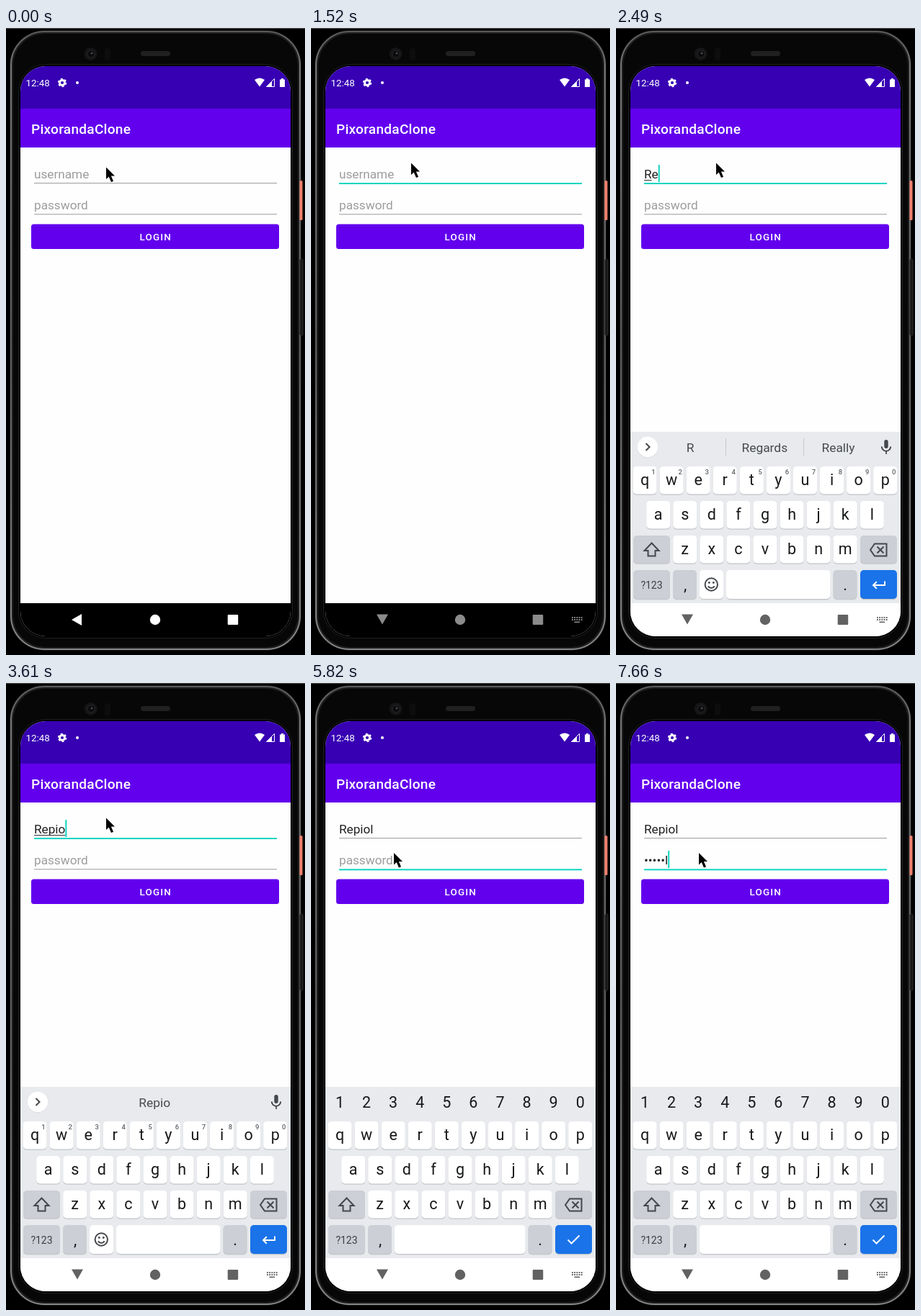
Write an HTML page that moves like this. It is 415 by 871 pixels and loops after 8000 ms.

```html
<!DOCTYPE html>
<html lang="en">
<head>
<meta charset="utf-8">
<title>Login screen</title>
<style>
  html, body { margin: 0; width: 100%; height: 100%; overflow: hidden; background: #000; }
  svg { display: block; width: 100%; height: 100%; font-family: Roboto, sans-serif; }
  .mid { text-anchor: middle; }
  .field { font-size: 17.2px; fill: #212121; }
  .letter { font-size: 21.5px; fill: #17181a; }
  .small { font-size: 9.5px; font-weight: 500; fill: #5f6368; }
  .word { font-size: 17.4px; fill: #46494d; }
  .icon { fill: none; stroke: #44474b; stroke-width: 2; }
  .go { fill: none; stroke: #fff; stroke-width: 2; }
</style>
</head>
<body>
<svg viewBox="0 0 415 871">
  <defs>
    <clipPath id="glass"><rect x="20" y="53" width="375" height="792" rx="35"/></clipPath>
    <linearGradient id="rim" x2="0" y2="1">
      <stop offset="0" stop-color="#5a5a5a"/><stop offset=".06" stop-color="#777"/>
      <stop offset=".5" stop-color="#5c5c5c"/><stop offset="1" stop-color="#858585"/>
    </linearGradient>
  </defs>

  <!-- phone body -->
  <rect width="415" height="871"/>
  <rect width="415" height="1" fill="#4a4a4a"/>
  <rect x="5.500" y="3.500" width="404" height="861" rx="48" fill="#2c2c2c"/>
  <rect x="7" y="5" width="401" height="858" rx="46.500" fill="#1d1d1d" stroke="url(#rim)" stroke-width="2"/>
  <rect x="10" y="8" width="395" height="852" rx="44" fill="#070707"/>
  <rect x="17.500" y="50.500" width="380" height="797" rx="37.500" fill="#000" stroke="#1f1f1f"/>
  <rect x="407.500" y="212" width="4" height="55" rx="1.500" fill="#f0806c"/>
  <rect x="408" y="321" width="4" height="106" rx="1.500" fill="#181818" stroke="#2e2e2e"/>
  <circle cx="117.500" cy="36" r="9" fill="#151516"/>
  <circle cx="118" cy="36" r="5" fill="#0b0b0d" stroke="#28282b"/>
  <circle cx="119" cy="35" r="1.500" fill="#45454e"/>
  <rect x="137" y="28" width="8" height="17" rx="3" fill="#0d0d0d"/>
  <rect x="187" y="32" width="41" height="7" rx="3.500" fill="#202020"/>

  <g clip-path="url(#glass)">
    <rect x="20" y="53" width="375" height="792" fill="#fefefe"/>
    <rect x="20" y="53" width="375" height="59" fill="#3700b3"/>
    <rect x="20" y="112" width="375" height="54" fill="#6200ee"/>

    <!-- status bar -->
    <g fill="#fff">
      <text x="27.500" y="81" font-size="13.400">12:48</text>
      <circle cx="78" cy="76" r="3.500" fill="none" stroke="#fff" stroke-width="2.800"/>
      <circle cx="78" cy="76" r="5.300" fill="none" stroke="#fff" stroke-width="1.800" stroke-dasharray="2.800 2.750"/>
      <circle cx="99" cy="76" r="2"/>
      <path d="M345 72Q352 67 359 72L352 81.500Z"/>
      <path d="M361.500 81.500L372.500 70.500V81.500Z" fill="none" stroke="#fff"/>
      <path d="M361 82L369 74V82Z"/>
      <path d="M380 71.500h2V70h3v1.500h2V82h-7Z"/>
    </g>
    <text x="35" y="146.500" font-size="19.100" font-weight="500" letter-spacing=".24" fill="#fff">PixorandaClone</text>

    <!-- form -->
    <rect id="userLine" x="39"/>
    <rect id="passLine" x="39"/>
    <text id="userHint" class="field" x="39" y="209">username</text>
    <text id="passHint" class="field" x="39" y="252">password</text>
    <text id="user" class="field" x="39" y="209"></text>
    <text id="pass" class="field" x="39" y="252"></text>
    <rect id="mark" x="39" y="211" height="1" fill="#333"/>
    <rect id="caret" width="2" height="24" fill="#12d5c1"/>
    <rect x="35" y="272.500" width="344" height="34.500" rx="3.500" fill="#6200ee"/>
    <text class="mid" x="207.700" y="295" font-size="13.400" font-weight="500" letter-spacing="1.200" fill="#fff">LOGIN</text>

    <!-- keyboard -->
    <g id="board">
      <rect x="20" y="561" width="375" height="240" fill="#e8eaed"/>
      <g id="keys"></g>
      <g id="plain">
        <circle cx="44" cy="582.500" r="14.500" fill="#d5d7da"/>
        <circle cx="44" cy="582" r="14.300" fill="#fff"/>
        <path class="icon" d="M41.500 577l5 5l-5 5"/>
        <g fill="#44474b"><rect x="372.300" y="572" width="5.400" height="12" rx="2.700"/><rect x="374.200" y="587" width="1.700" height="5"/></g>
        <path class="icon" d="M368.800 581.500a6.200 6.200 0 0 0 12.400 0"/>
        <path id="bars" d="M152.500 570V594M260.500 570V594" stroke="#c6c8cb"/>
        <text class="word mid" x="103" y="588.500"></text>
        <text class="word mid" x="206.300" y="588.500"></text>
        <text class="word mid" x="308.500" y="588.500"></text>
        <g id="supers"></g>
        <g id="smileKey"></g>
        <g class="icon"><circle cx="132.300" cy="773" r="8.700"/><path d="M127.800 775.500q4.500 5 9 0"/></g>
        <circle cx="129.300" cy="770.500" r="1.400" fill="#44474b"/><circle cx="135.300" cy="770.500" r="1.400" fill="#44474b"/>
        <path class="go" d="M373 768.500v5.500h-16m4.800-4.800l-4.800 4.800l4.800 4.800"/>
      </g>
      <g id="secret">
        <g id="digits"></g>
        <path class="go" d="M356.500 773.500l5 5l11-11"/>
      </g>
    </g>

    <!-- navigation bar -->
    <rect id="nav" x="20" y="799" width="375" height="46"/>
    <g id="navIcons">
      <path id="back"/>
      <circle cx="207" cy="822" r="7.200"/>
      <rect x="307.700" y="815" width="14.500" height="14" rx="1"/>
      <path id="switcher" fill="none" stroke-width="1.800"
        d="M362 819h15M362 822h15" stroke-dasharray="1.800 1.400"/>
      <rect id="spaceDot" x="365.500" y="824.500" width="7.500" height="1.600"/>
    </g>
  </g>
  <path id="mouse" d="M0 0V16.500L3.700 13L7 20.500L10 19.200L6.900 12H12Z" stroke="#fff" paint-order="stroke"/>
</svg>
<script>
const $ = id => document.getElementById(id);
const set = (id, attrs) => { for (const k in attrs) $(id).setAttribute(k, attrs[k]); };
const show = (id, on) => { $(id).style.display = on ? '' : 'none'; };

const LOOP = 8000, TEAL = '#12d5c1', PITCH = 37.08;
const NAME = 'Repiol';
const HINTS = [
  ['', '', ''], ['R', 'Regards', 'Really'], ['Re', 'Really', 'Ready'],
  ['Rep', 'Report', 'Reply'], ['Repi', 'Replied', 'Repair'], ['', 'Repio', ''], ['', NAME, '']
];

// Keyboard construction
const key = (x, y, w, fill = '#fff', h = 38.5) =>
  `<rect x="${x}" y="${y + 1.3}" width="${w}" height="${h}" rx="5" fill="#c3c5c9"/>` +
  `<rect x="${x}" y="${y}" width="${w}" height="${h}" rx="5" fill="${fill}"/>`;
const label = (s, x, y, cls = 'letter') => `<text class="${cls} mid" x="${x}" y="${y}">${s}</text>`;
const row = (chars, x, y) => [...chars].map((c, i) =>
  key(x + i * PITCH - 16.5, y, 33) + label(c, x + i * PITCH, y + 26)).join('');
const spread = (x, y, cls) => [...'1234567890'].map((c, i) => label(c, x + i * PITCH, y, cls)).join('');

const GREY = '#cccfd5';
$('keys').innerHTML =
  row('qwertyuiop', 40, 609) + row('asdfghjkl', 58.7, 657) + row('zxcvbnm', 95.7, 705) +
  key(24, 705, 51, GREY) + key(339, 705, 51, GREY) +
  key(24, 753, 51, GREY, 40) + key(79, 753, 33, GREY, 40) +
  key(116, 753, 181.5, '#fff', 40) + key(301.5, 753, 33, GREY, 40) +
  key(339, 753, 51, '#1a73e8', 40) +
  label(',', 96, 781) + label('.', 318, 781) +
  '<text class="mid" x="49.500" y="778.500" font-size="14" fill="#3c4043">?123</text>' +
  '<path class="icon" d="M49.500 715.500L59.500 726H54.500V733.500H44.500V726H39.500Z"/>' +
  '<path class="icon" d="M353 725L359 716.500H375.500V733.500H359ZM362.500 720.500l9 9m0-9l-9 9"/>';
$('supers').innerHTML = spread(52, 619.5, 'small');
$('digits').innerHTML = spread(40, 590, 'letter');
// Emoji key plus the gap that shortens the space bar
$('smileKey').innerHTML =
  '<rect x="115" y="752" width="45" height="44" fill="#e8eaed"/>' +
  key(116, 753, 33, '#fff', 40) + key(153, 753, 144.5, '#fff', 40);
const words = document.querySelectorAll('.word');

// Latest value whose start time has passed
const at = (t, first, ...steps) =>
  steps.reduce((value, [start, next]) => t >= start ? next : value, first);

function fieldLine(id, y, focused) {
  set(id, {
    y, height: focused ? 2 : 1,
    width: 337, fill: focused ? TEAL : '#9c9c9c'
  });
}

function draw(t) {
  const onPass = t >= 5120;

  // Username and its suggestions
  const typed = at(t, 0, [2190, 1], [2490, 2], [3040, 3], [3320, 4], [3460, 5], [3740, 6]);
  const known = at(t, 0, [2330, 1], [2610, 2], [3180, 3], [3320, 4], [3610, 5], [3890, 6]);
  $('user').textContent = NAME.slice(0, typed);
  set('mark', { width: known && !onPass ? $('user').getSubStringLength(0, known) : 0 });
  HINTS[known].forEach((s, i) => { words[i].textContent = s; });
  show('bars', HINTS[known][0]);

  // Password: last character stays readable for a moment
  const secret = at(t, 0, [6190, 1], [6460, 2], [6990, 3], [7120, 4], [7380, 5], [7660, 6]);
  const masked = t >= 7250 && t < 7380 ? secret : Math.max(0, secret - 1);
  $('pass').textContent = '•'.repeat(masked) + NAME.toLowerCase().slice(masked, secret);

  show('userHint', !typed);
  show('passHint', !secret);
  $('userHint').style.fill = t >= 400 && t < 670 ? '#747474' : '#9c9c9c';
  $('passHint').style.fill = onPass && t < 5390 ? '#747474' : '#9c9c9c';
  fieldLine('userLine', 215, t >= 280 && !onPass);
  fieldLine('passLine', 258.3, onPass);

  const lit = at(t, false, [400, true], [950, false], [1790, true], [4320, false],
    [4840, true], [5670, false], [6190, true]);
  const text = $(onPass ? 'pass' : 'user');
  set('caret', { x: 39 + text.getComputedTextLength(), y: onPass ? 233 : 190 });
  show('caret', lit);

  // Keyboard and navigation bar
  show('board', t >= 1640);
  set('board', { transform: `translate(0 ${t < 1790 ? 110 : 0})` });
  show('plain', t < 5240);
  show('secret', t >= 5240);
  const open = t >= 1380, light = t >= 1640;
  const tint = light ? '#626262' : open ? '#8b8b8b' : '#fff';
  set('nav', { fill: light ? '#fff' : '#000' });
  set('navIcons', { fill: tint });
  set('back', { d: open ? 'M91 814.500H107L99 828.500Z' : 'M105 814V830L91 822Z' });
  set('switcher', { stroke: tint });
  show('switcher', open);
  show('spaceDot', open);

  const [x, y] = at(t, [139, 193.5], [950, [139, 191]], [1090, [139, 187.5]],
    [4690, [128, 211]], [4840, [115, 238.5]], [5670, [115, 236]]);
  set('mouse', { transform: `translate(${x} ${y})` });
}

const begin = performance.now();
function tick() {
  draw((performance.now() - begin) % LOOP);
  requestAnimationFrame(tick);
}
tick();
</script>
</body>
</html>
```
